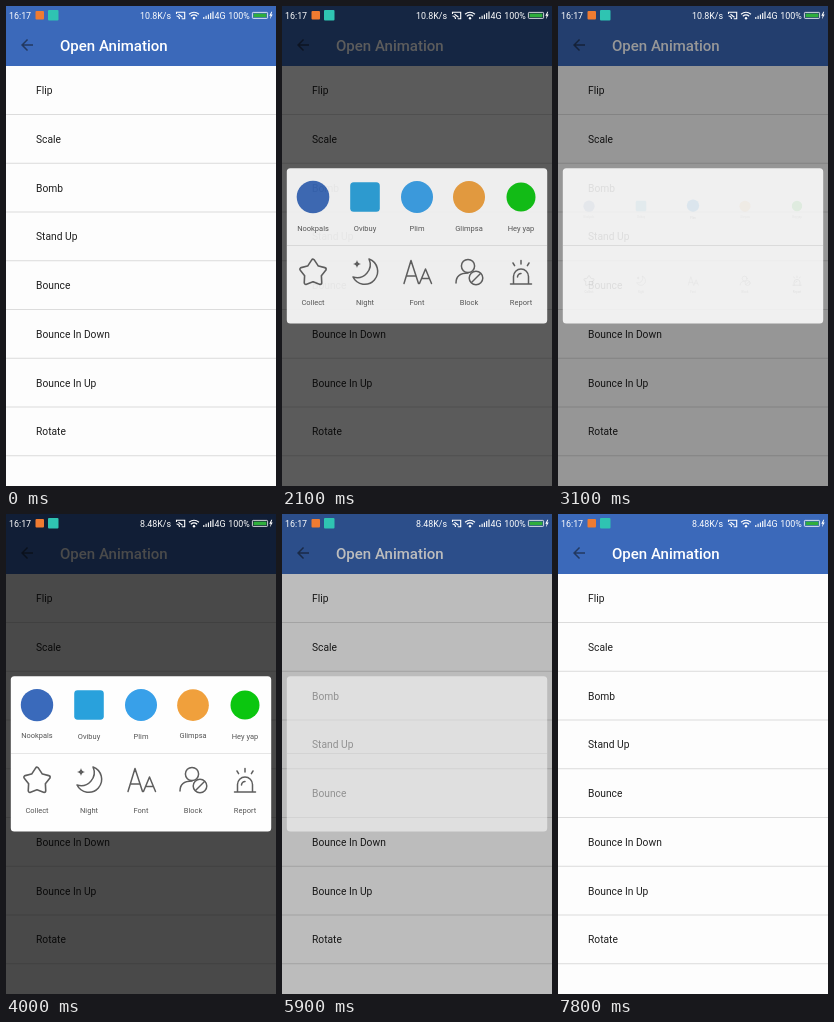
Animation, 270 px wide and 480 px high, one loop 8 s. Source, as an HTML page:

```html
<!DOCTYPE html>
<html lang="en">
<head>
<meta charset="utf-8">
<title>Open Animation</title>
<style>
  html, body { margin: 0; width: 100%; height: 100%; overflow: hidden; background: #fdfdfd; }
  svg { display: block; width: 100vw; height: 100vh; }
  text { font-family: Roboto, "Noto Sans", sans-serif; }
  .title { font-size: 15px; font-weight: 500; fill: #fff; }
  .row { font-size: 10.25px; fill: #1f1f1f; }
  .status { font-size: 8.9px; fill: #fff; }
  .label { font-size: 7.5px; fill: #555; text-anchor: middle; }
  .line { fill: none; stroke: #5e5e5e; stroke-width: 1.5; stroke-linecap: round; stroke-linejoin: round; }
  .thin { fill: none; stroke: #fff; stroke-width: 1.1; }
</style>
</head>
<body>
<svg viewBox="0 0 270 480" preserveAspectRatio="none">
  <defs>
    <clipPath id="card"><rect x="4.8" y="162.3" width="260.4" height="155.3" rx="3.5"/></clipPath>
  </defs>

  <rect width="270" height="480" fill="#fdfdfd"/>
  <g id="list"></g>
  <rect width="270" height="60" fill="#3b69ba"/>
  <path transform="translate(12 30) scale(.75)" fill="#233960"
    d="M20 11H7.83l5.59-5.59L12 4l-8 8 8 8 1.41-1.41L7.83 13H20z"/>
  <text class="title" x="54" y="45">Open Animation</text>

  <rect id="dim" width="270" height="480" opacity="0"/>

  <g id="panel" clip-path="url(#card)" opacity="0">
    <rect x="4" y="162" width="262" height="157" fill="#fefefe"/>
    <path d="M5 239.5H265" stroke="#e6e6e6"/>
    <g id="items"></g>
  </g>

  <text class="status" x="3" y="12.8">16:17</text>
  <rect x="29.5" y="5" width="8.5" height="8.5" rx="1" fill="#ef7b31"/>
  <rect x="42" y="4" width="10.5" height="10.5" rx="1" fill="#2fc4b2"/>
  <text class="status" id="speed" x="134" y="12.8">10.8K/s</text>
  <path class="thin" d="M170.5 8V6.2h8.2v6.6h-3M170.5 10a3 3 0 0 1 3 3M172.5 8.2l4 3"/>
  <path class="thin" d="M183 8.2q5-4 10 0M184.8 10.2q3.2-2.6 6.4 0"/>
  <circle cx="188" cy="12.3" r="1.2" fill="#fff"/>
  <path class="thin" d="M197.8 13v-2M200.1 13v-3.2M202.4 13v-4.6M204.7 13v-6M207 13v-7.4"/>
  <text class="status" x="208.6" y="12.8">4G</text>
  <text class="status" x="222.3" y="12.8">100%</text>
  <rect x="246.4" y="6.4" width="15.2" height="6" rx=".8" fill="none" stroke="#fff" stroke-width=".8"/>
  <rect x="247.6" y="7.6" width="12.8" height="3.6" fill="#2fae3c"/>
  <path d="M265.3 5.8l-2 4h1.4l-.8 3.4 2.8-4.6h-1.5l1-2.8z" fill="#fff"/>
</svg>

<script>
const LOOP = 8000;
const $ = id => document.getElementById(id);
const clamp = v => Math.max(0, Math.min(1, v));
const span = (t, from, to) => clamp((t - from) / (to - from));
const smooth = p => (1 - Math.cos(Math.PI * p)) / 2;
const easeOut = p => 1 - (1 - p) ** 2;

// Evenly spaced values joined by straight segments.
function track(p, values) {
  const x = p * (values.length - 1);
  const i = Math.min(Math.floor(x), values.length - 2);
  return values[i] + (values[i + 1] - values[i]) * (x - i);
}

const rows = ["Flip", "Scale", "Bomb", "Stand Up", "Bounce", "Bounce In Down", "Bounce In Up", "Rotate"];
$("list").innerHTML = rows.map((name, i) => {
  const y = 48.75 * i;
  return `<text class="row" x="30" y="${88.2 + y}">${name}</text>
    <rect y="${108 + y}" width="270" height="1" fill="#dcdcdc"/>`;
}).join("");

// A wide dark stroke under a narrower white one leaves rounded tips.
function star(outer, inner) {
  const points = Array.from({ length: 10 }, (_, i) => {
    const a = i * Math.PI / 5, r = i % 2 ? inner : outer;
    return `${(r * Math.sin(a)).toFixed(2)},${(1 - r * Math.cos(a)).toFixed(2)}`;
  }).join(" ");
  const layer = (color, width) => `<polygon points="${points}" fill="${color}" stroke="${color}"
    stroke-width="${width}" stroke-linejoin="round"/>`;
  return layer("#5e5e5e", 5) + layer("#fefefe", 1.8);
}
const disc = (color, r) => `<circle r="${r}" fill="${color}"/>`;
const line = d => `<path class="line" d="${d}"/>`;

// name, icon, time the entrance takes
const items = [
  ["Nookpals", disc("#3a6abb", 16.3), 1099],
  ["Ovibuy", `<rect x="-14.8" y="-14.8" width="29.6" height="29.6" rx="3.5" fill="#29a1dc"/>`, 1035],
  ["Plim", disc("#38a0e9", 16), 800],
  ["Glimpsa", disc("#f0a03c", 16), 1127],
  ["Hey yap", disc("#0bc60f", 14.5), 983],
  ["Collect", star(12, 7), 800],
  ["Night", line("M4-13A13 13 0 1 1-12 5A13.2 13.2 0 0 0 4-13") +
    `<path d="M-8-12q.6 3.4 4 4q-3.4.6-4 4q-.6-3.4-4-4q3.4-.6 4-4" fill="#5e5e5e"/>`, 938],
  ["Font", line("M-13 11.5L-6-11.5L1.5 11.5M-10.6 4H-1M2.5 11.5L8.5-3L14.5 11.5M4.6 6.5h7.8"), 943],
  ["Block", line("M-13 11C-13 4-8 1-1 1") +
    `<circle class="line" cx="-1" cy="-6" r="6.6"/><circle class="line" cx="7" cy="6" r="6.8"/>` +
    line("M2.5 10.5L11.5 1.5"), 890],
  ["Report", line("M-10.5 12h21M-7.5 12V4.5a7.5 7.5 0 0 1 15 0V12M-3.5 5a3.5 3.5 0 0 1 3.5-3.5M0-11.5v3.5M-8-9l1.6 2.6M8-9l-1.6 2.6"), 790]
].map(([name, icon, time], i) => {
  const x = 31 + 52 * (i % 5), low = i > 4;
  return { name, icon, time, x, y: low ? 266 : 191, text: low ? 298.9 : 224.6, base: low ? 322 : 247 };
});
$("items").innerHTML = items.map(it =>
  `<g><g transform="translate(${it.x} ${it.y})">${it.icon}</g>
   <text class="label" x="${it.x}" y="${it.text}">${it.name}</text></g>`).join("");
const nodes = [...$("items").children];

// Each entrance returns a transform for the eased progress e.
const standUp = (it, e) => `rotate(${90 * (1 - e)} ${it.x + 30} ${it.base})`;
const bounce = (it, e) => {
  const s = track(e, [.3, 1.05, .9, 1]), y = it.base - 42;
  return `translate(${it.x} ${y}) scale(${s}) translate(${-it.x} ${-y})`;
};
const dropIn = (it, e) => `translate(0 ${track(e, [-78, 7.5, -2.5, 0])})`;

const shows = [
  { start: 0, close: 2030, enter: standUp, slow: 1, fade: 1 },
  { start: 2800, close: 4730, enter: bounce, slow: 1, fade: 3 },
  { start: 5700, close: 7430, enter: dropIn, slow: 1.15, fade: 3 }
];

function draw(t) {
  const show = shows.filter(s => t >= s.start).pop();
  const r = t - show.start;
  const stay = 1 - smooth(span(t, show.close, show.close + 350));
  $("dim").setAttribute("opacity", .71 * easeOut(span(r, 60, 750)) * stay);
  $("panel").setAttribute("opacity", easeOut(span(r, 100, 420)) * stay);
  $("speed").textContent = t < 3800 ? "10.8K/s" : "8.48K/s";
  items.forEach((it, i) => {
    const e = smooth(span(r, 200, 200 + it.time * show.slow));
    nodes[i].setAttribute("transform", show.enter(it, e));
    nodes[i].setAttribute("opacity", clamp(e * show.fade));
  });
}

function tick() {
  draw(performance.now() % LOOP);
  requestAnimationFrame(tick);
}
tick();
</script>
</body>
</html>
```
